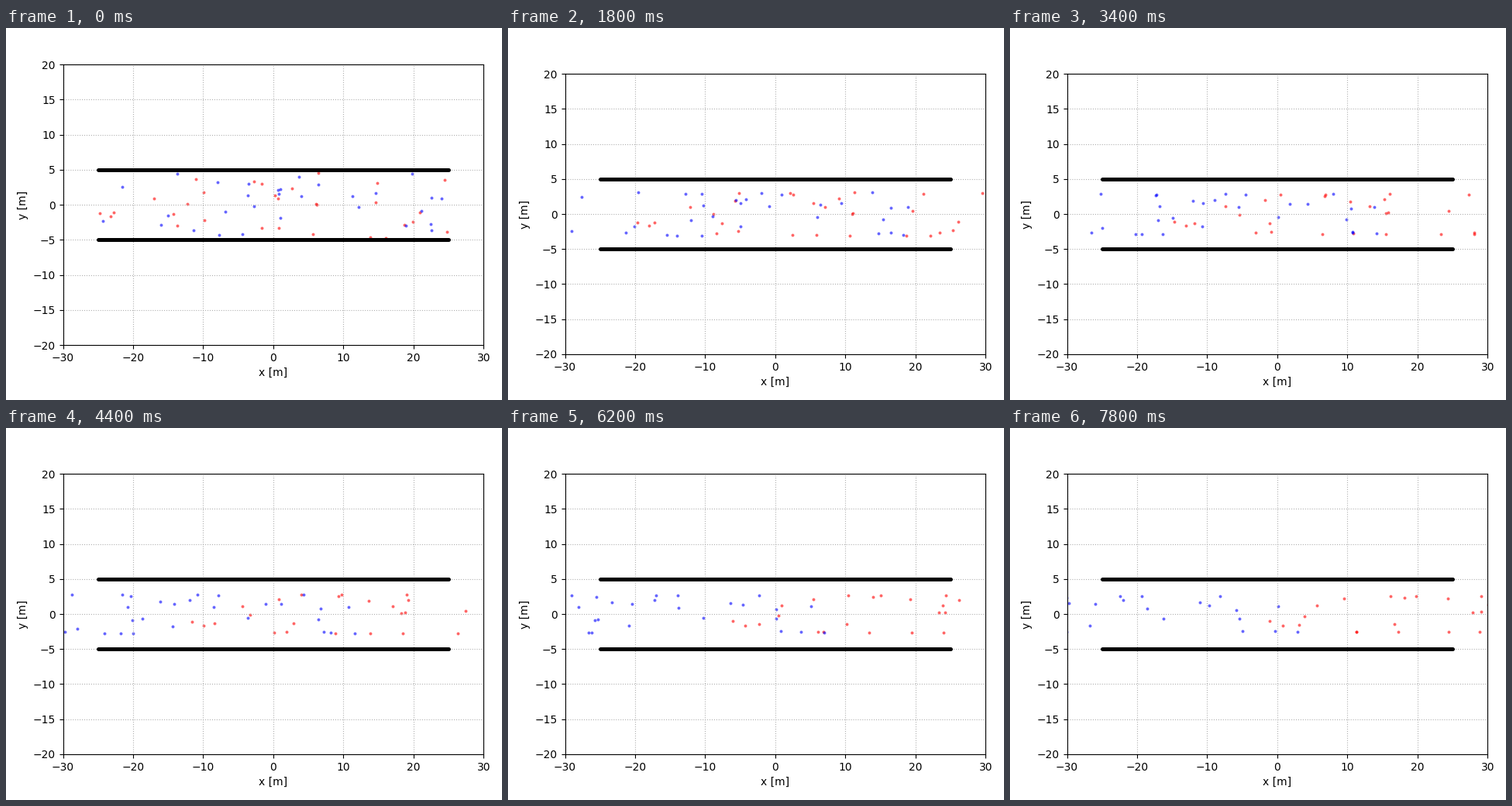
Write a matplotlib script that moves like this. It is 640 by 480 pixels and loops after 8 s.

```python
import numpy as np
import matplotlib.pyplot as plt
from matplotlib.animation import FuncAnimation

FRAMES, STEP = 40, 200
HALF_LENGTH, HALF_WIDTH = 25, 5       # corridor, metres
CROWD = 30                            # walkers in each direction
SPEED, SPREAD, DRIFT = 3.2, 0.55, 0.06
START_LAG = 0.3                       # seconds to reach walking speed
WALL_REACH, WALL_PUSH = 0.33, 0.15    # range and strength of wall avoidance
CLEARANCE = 2                         # metres from the wall where it sets in

rng = np.random.default_rng(7)


def keep_off_walls(y, t):
    """Slide sideways at a rate that grows exponentially near a wall."""
    edge = HALF_WIDTH - CLEARANCE
    near = np.exp((edge - np.abs(y)) / WALL_REACH)
    gap = WALL_REACH * np.log(near + t * WALL_PUSH / WALL_REACH)
    return np.sign(y) * (edge - gap)


class Walkers:
    def __init__(self, heading, color):
        self.x = rng.uniform(-HALF_LENGTH, HALF_LENGTH, CROWD)
        self.y = rng.uniform(-0.95, 0.95, CROWD) * HALF_WIDTH
        speed = np.clip(rng.normal(SPEED, SPREAD, CROWD), 1.8, 5)
        self.vx = heading * speed
        self.vy = rng.normal(0, DRIFT, CROWD)
        self.dots = ax.scatter([], [], s=8, color=color, alpha=0.6,
                               linewidths=0)

    def move(self, t):
        lost = 0.5 * START_LAG * (1 - np.exp(-t / START_LAG))
        x = self.x + self.vx * (t - lost)
        y = keep_off_walls(self.y + self.vy * t, t)
        self.dots.set_offsets(np.column_stack([x, y]))


fig, ax = plt.subplots(figsize=(6.4, 4.8), dpi=100)
ax.set_xlim(-30, 30)
ax.set_ylim(-20, 20)
ax.set_aspect("equal")
ax.set_xlabel("x [m]")
ax.set_ylabel("y [m]")
ax.grid(linestyle=":")
for wall in (-HALF_WIDTH, HALF_WIDTH):
    ax.plot([-HALF_LENGTH, HALF_LENGTH], [wall, wall], color="black",
            lw=3.6, solid_capstyle="round")

groups = [Walkers(1, "red"), Walkers(-1, "blue")]

# The layout settles over the first few frames.
margins = []
for _ in range(6):
    fig.tight_layout()
    p = fig.subplotpars
    margins.append(dict(left=p.left, right=p.right, bottom=p.bottom, top=p.top))


def draw(i):
    fig.subplots_adjust(**margins[min(i, len(margins) - 1)])
    for group in groups:
        group.move(i * STEP / 1000)
    return [group.dots for group in groups]


anim = FuncAnimation(fig, draw, frames=FRAMES, interval=STEP,
                     init_func=lambda: draw(0), repeat=True, repeat_delay=0)
plt.show()
```
